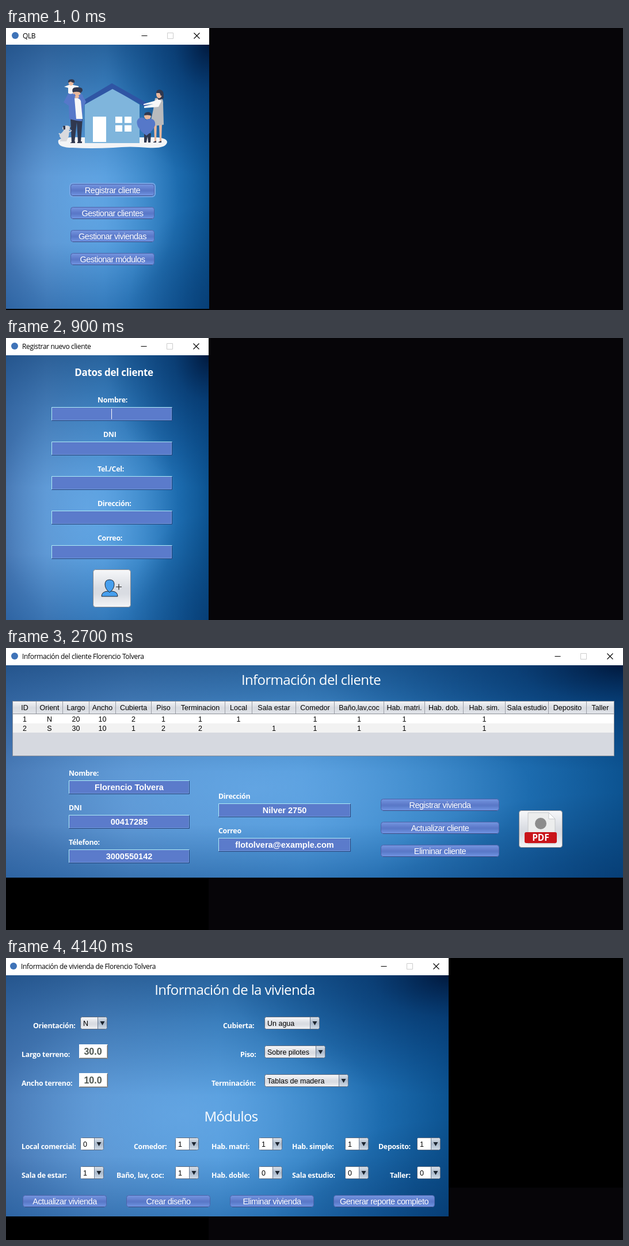
Recreate the animation shown at these times as an HTML page. Size 1072x490 px, loop 4.5 s.

```html
<!DOCTYPE html>
<html lang="es">
<head>
<meta charset="utf-8">
<title>Gestión de viviendas</title>
<style>
  html, body { margin: 0; width: 100%; height: 100%; overflow: hidden; background: #060508; }
  svg { display: block; width: 1072px; height: 490px; }
  .bar { font: 12px "Open Sans", sans-serif; letter-spacing: -.35px; fill: #000; }
  .head { font: 24px "Open Sans", sans-serif; letter-spacing: -.63px; fill: #fff; }
  .sub { font: 700 17px "Open Sans", sans-serif; letter-spacing: -.3px; fill: #fff; }
  .label { font: 700 12.4px "Open Sans", sans-serif; letter-spacing: -.3px; fill: #fff; }
  .btn { font: 14.5px "Liberation Sans", Arial, sans-serif; letter-spacing: -.5px; fill: #fff; }
  .cell { font: 12.5px "Liberation Sans", Arial, sans-serif; fill: #000; }
  .value { font: 700 14.5px "Liberation Sans", Arial, sans-serif; fill: #fff; }
  .num { font: 700 16px "Liberation Sans", Arial, sans-serif; fill: #4d554f; }
  .pdf { font: 700 15.5px "Open Sans", sans-serif; fill: #fff; }
</style>
</head>
<body>
<svg id="stage" viewBox="0 0 1072 490">
  <defs>
    <linearGradient id="base">
      <stop offset="0" stop-color="#4676b2"/><stop offset=".2" stop-color="#5a91cd"/>
      <stop offset=".48" stop-color="#4e99da"/><stop offset=".65" stop-color="#3585c7"/>
      <stop offset=".85" stop-color="#1c6bae"/><stop offset="1" stop-color="#0c5391"/>
    </linearGradient>
    <radialGradient id="glow" cx=".4" cy=".58" r=".45">
      <stop offset="0" stop-color="#68a9e6" stop-opacity=".75"/>
      <stop offset="1" stop-color="#68a9e6" stop-opacity="0"/>
    </radialGradient>
    <linearGradient id="edges" x2="0" y2="1">
      <stop offset="0" stop-color="#0f3f74" stop-opacity=".6"/>
      <stop offset=".2" stop-color="#0f4680" stop-opacity=".32"/>
      <stop offset=".5" stop-color="#0f4680" stop-opacity="0"/>
      <stop offset=".75" stop-color="#0b4a8c" stop-opacity="0"/>
      <stop offset="1" stop-color="#0b4a8c" stop-opacity=".4"/>
    </linearGradient>
    <radialGradient id="corner" cx="1" cy="0" r=".5">
      <stop offset="0" stop-color="#00173a" stop-opacity=".95"/>
      <stop offset=".35" stop-color="#002a5c" stop-opacity=".5"/>
      <stop offset="1" stop-color="#003a78" stop-opacity="0"/>
    </radialGradient>
    <radialGradient id="foot" cx="1" cy="1" r=".4">
      <stop offset="0" stop-color="#012a58" stop-opacity=".45"/>
      <stop offset="1" stop-color="#012a58" stop-opacity="0"/>
    </radialGradient>
    <linearGradient id="blue" x2="0" y2="1">
      <stop offset="0" stop-color="#7596e0"/><stop offset=".5" stop-color="#5b78c8"/>
      <stop offset=".6" stop-color="#5a7ac9"/><stop offset="1" stop-color="#7396e4"/>
    </linearGradient>
    <linearGradient id="grey" x2="0" y2="1">
      <stop offset="0" stop-color="#f7f8fa"/><stop offset=".5" stop-color="#d9dce2"/>
      <stop offset=".65" stop-color="#d9dce2"/><stop offset="1" stop-color="#f4f5f7"/>
    </linearGradient>
    <linearGradient id="header" x2="0" y2="1">
      <stop offset="0" stop-color="#f3f4f6"/><stop offset=".5" stop-color="#d9dce2"/>
      <stop offset="1" stop-color="#e0e3e8"/>
    </linearGradient>
    <linearGradient id="arrow" x2="0" y2="1">
      <stop offset="0" stop-color="#d8dfe8"/><stop offset=".5" stop-color="#aab9cb"/>
      <stop offset="1" stop-color="#cfdae6"/>
    </linearGradient>
  </defs>
</svg>
<script>
const HOLD = 900;
const NAME = "Florencio Tolvera", MAIL = "flotolvera@example.com";
const ID = "00417285", PHONE = "3000550142", STREET = "Nilver 2750";

const box = (x, y, w, h, fill, more = "") =>
  `<rect x="${x}" y="${y}" width="${w}" height="${h}" fill="${fill}" ${more}/>`;
const path = (d, fill, more = "") => `<path d="${d}" fill="${fill}" ${more}/>`;
const line = (d, color, w = 1) => path(d, "none", `stroke="${color}" stroke-width="${w}"`);
const oval = (x, y, rx, ry, fill, more = "") =>
  `<ellipse cx="${x}" cy="${y}" rx="${rx}" ry="${ry}" fill="${fill}" ${more}/>`;
const text = (cls, x, y, s) => `<text class="${cls}" x="${x}" y="${y}">${s}</text>`;
const mid = (cls, x, y, s) => `<text class="${cls}" x="${x}" y="${y}" text-anchor="middle">${s}</text>`;

// Window frame: title bar with controls, and the blue backdrop below it
function frame(w, bottom, bar, title, tx, close) {
  const y = bar === 30 ? 14 : 13, cy = y + .5, cx = close + .5;
  return box(0, 0, w, bar, "#fff") +
    ["base", "glow", "edges", "corner", "foot"]
      .map(g => box(0, bar, w, bottom - bar, `url(#${g})`)).join("") +
    `<circle cx="${tx - 13}" cy="${y}" r="6" fill="#3f73b8"/>` +
    text("bar", tx, y + 5, title) +
    line(`M${cx - 96} ${cy}h10`, "#000") +
    line(`M${cx - 51} ${cy - 5}h10v10h-10z`, "#ccc") +
    line(`M${cx - 5} ${cy - 5}l10 10m0-10l-10 10`, "#000", 1.1);
}

function button(x, y, w, s, focus) {
  return (focus ? box(x - 1, y - 1, w + 2, 23, "none", 'rx="5" stroke="#78a6e6" stroke-width="2"') : "") +
    box(x + .5, y + .5, w - 1, 20, "url(#blue)", 'rx="4" stroke="#4c62a8"') +
    line(`M${x + 4} ${y + 20.5}h${w - 8}`, "#3c4a80") +
    mid("btn", x + w / 2, y + 16, s);
}

function field(x, y, w, s = "") {
  return box(x, y, w, 24, "#5b7bcb") +
    line(`M${x + 1.5} ${y + 22.5}h${w - 3}v-21`, "#6f9bdc") +
    line(`M${x + .5} ${y + 23.5}h${w - 1}v-23`, "#243f78") +
    line(`M${x + .5} ${y + 23}v-22.5h${w - 1}`, "#b0ecf6") +
    mid("value", x + w / 2, y + 17, s);
}

const labelled = (x, y, w, name, s, lx = x) => text("label", lx, y - 8, name) + field(x, y, w, s);

const greyButton = (x, y, w, h) =>
  box(x + .5, y + .5, w - 1, h - 1, "url(#grey)", 'rx="4" stroke="#85888f"');

function pdfButton(x, y, w) {
  const c = x + w / 2;
  return greyButton(x, y, w, 65) +
    path(`M${c - 22} ${y + 4}h36l11 11v43h-47z`, "#eceded", 'stroke="#c4c6c9"') +
    path(`M${c + 14} ${y + 4}v11h11z`, "#fff", 'stroke="#c4c6c9"') +
    oval(c, y + 23, 10, 10, "#8c8c8c") +
    box(c - 28, y + 38, 56, 19, "#c9141a", 'rx="3"') +
    mid("pdf", c, y + 53, "PDF");
}

// edges: column borders; rows: cell texts, the first row is the header
function table(y, h, edges, rows) {
  const x = edges[0], r = edges[edges.length - 1], w = r - x;
  let out = box(x, y, w, h, "#d6d9e0") + box(x, y, w, 21, "url(#header)") +
    box(x, y + 22, w, 16, "#fff") + box(x, y + 38, w, 16, "#f2f2f2") +
    line(`M${x} ${y + 21.5}H${r}`, "#8e9198");
  for (const e of edges.slice(1)) out += line(`M${e + .5} ${y}v21`, "#9a9da5");
  out += box(x - .5, y - .5, w + 1, h + 1, "none", 'stroke="#868c98"');
  rows.forEach((row, i) => row.forEach((s, k) => {
    out += mid("cell", (edges[k] + edges[k + 1]) / 2 + .5, y + [15, 35, 51][i], s);
  }));
  return out;
}

function combo(x, y, w, s, part) {
  const a = x + w - part;
  return box(x + .5, y + .5, w - 1, 21, "url(#grey)", 'rx="3" stroke="#5d6b80"') +
    path(`M${a} ${y + 1}h${part - 4}q3 0 3 3v14q0 3-3 3h${4 - part}z`, "url(#arrow)") +
    line(`M${a + .5} ${y + 1}v20`, "#6d7d94") +
    path(`M${a + part / 2 - 4} ${y + 8}h8l-4 7z`, "#1c2530") +
    text("cell", x + 5, y + 16, s);
}

const picker = (x, y, s) => combo(x, y, 41, "", 17) + box(x + 1, y + 1, 23, 20, "#fff") +
  text("cell", x + 5, y + 16, s);

const numBox = (y, s) => box(127, y, 50, 25, "#fff") +
  line(`M127 ${y + 24.5}h49.5v-24`, "#6d6d6d") + line(`M128 ${y + 23.5}h47.5v-22`, "#b5b5b5") +
  mid("num", 151, y + 18, s);

function family() {
  const dark = "#30384f", skin = "#e9b89c", coat = "#5678c9", white = "#f7f7f8", fur = "#d9dade";
  return path("M91 195q8-6 40-5h110q38-2 39 8q-1 12-34 10q-30-3-60 0q-40 2-70 0q-28 0-25-13z", "#f3f4f6") +
    path("M137 133l47-29 48 29v67h-95z", "#7fb5dc") +
    path("M132 127l52-31 64 36-4 6-59-32-52 29z", "#2f55a4") +
    box(151, 154, 23, 44, "#fff") +
    [[190, 154], [206, 154], [190, 169], [206, 169]].map(([x, y]) => box(x, y, 12, 11, "#fff")).join("") +
    // father with a child on his shoulders
    path("M112 157h21l-3 41h-5l-2-34-4 35h-5z", dark) +
    path("M112 199l8-2v3h-8zm12-1l8-1v3h-8z", dark) +
    path("M108 114q14-5 24 2l7 12-4 8-3 26q-12-1-22-4l-1-23-9-6z", coat) +
    path("M119 122q9-1 11 5l3 31h-11z", white) +
    path("M101 102l11-4 14 3v2l-9 2v8q-5 3-9 0v-9z", white) +
    oval(113, 95, 4.5, 5, skin) + path("M108 95q-1-6 6-6 6 0 5 6-5 0-6-2z", dark) +
    oval(123, 114, 6.5, 8, skin) + path("M116 112q-3-9 7-9 11-1 10 6l-3 4q-5-4-14-1z", dark) +
    path("M113 118l6-4 2 4-7 8zM126 117l5-3 3 4-5 6z", coat) +
    // dog
    path("M101 177l9 1-1 10-4 9h-12l3-4-3-5q0-4 4-6z", fur) +
    oval(105, 174, 7, 4.5, fur) + path("M99 170l4 0 0 6-3 1z", dark) + oval(112, 174, 1.3, 1.3, dark) +
    line("M109 181l5-3M95 186l-3-3", fur, 2) +
    // mother
    path("M257 166h5l-1 31h-3zM266 166h5l-1 31h-3z", skin) +
    path("M256 198l5-2v3h-5zm9 0l5-2v3h-5z", dark) +
    path("M259 122l9-1q6 2 5 11l1 36q-13 3-24 1l6-28z", "#b8babd") +
    path("M239 132l18-5 8-4 5 4-5 10-25 2v-3l16-4-17 2z", white) +
    path("M271 113q5 5 2 10l-8 2-4-7z", dark) +
    oval(266, 115, 5, 7, skin) + path("M261 113q0-6 6-6 7 1 7 9l-5 2-2-5z", dark) +
    // child with a heart
    path("M240 183h12l-1 16h-4l-1-11-2 11h-4z", dark) +
    oval(246, 153, 6, 6, skin) + path("M240 152q0-6 7-6 6 0 6 7-5-3-13-1z", dark) +
    path("M243 160q-5-7-12-3-6 4-2 14 5 9 15 16 12-9 15-18 1-9-6-11-6-1-10 2z", coat);
}

function menu() {
  return box(0, 488, 353, 2, "#000") + frame(353, 488, 29, "QLB", 29, 331) + family() +
    ["Registrar cliente", "Gestionar clientes", "Gestionar viviendas", "Gestionar módulos"]
      .map((s, i) => button(112, 271 + 40 * i, 146, s, i === 0)).join("");
}

function newClient() {
  return frame(352, 490, 30, "Registrar nuevo cliente", 28, 330) +
    mid("sub", 187.5, 66, "Datos del cliente") +
    ["Nombre:", "DNI", "Tel./Cel:", "Dirección:", "Correo:"]
      .map((s, i) => labelled(79, 120 + 60 * i, 210, s, "", i === 1 ? 169 : 159)).join("") +
    line("M183.5 123v18", "#fff") + greyButton(151, 402, 66, 66) +
    path("M166 449q0-8 10-9h9q9 1 9 9z", "#479fee", 'stroke="#1d2530" stroke-linejoin="round"') +
    path("M172 428q0-8 8-8t8 8-8 14q-8-6-8-14z", "#479fee", 'stroke="#1d2530"') +
    line("M191 432.5h10M196 427.5v10", "#222", 1.2);
}

function clients() {
  return box(0, 350, 352, 140, "#000") +
    frame(761, 350, 29, "Gestionar clientes", 28, 740) +
    mid("head", 393, 63, "Clientes registrados") +
    table(92, 154, [22, 76, 236, 316, 426, 546, 736], [
      ["ID", "Nombre", "DNI", "Teléfono", "Dirección", "Correo"],
      ["1", NAME, ID, PHONE, STREET, MAIL],
      ["2", "Constantino Tolvera", "00263914", "3000550187", "La Tusma 3160", "constolvera@example.com"]]) +
    pdfButton(122, 262, 65) + mid("btn", 564, 284, "Filtrar por nombre:") +
    box(491.5, 291.5, 145, 26, "#4161a8", 'stroke="#a9bdd6"') + line("M491 291.5h146", "#2d4c86");
}

function client() {
  const heads = "ID|Orient|Largo|Ancho|Cubierta|Piso|Terminacion|Local|Sala estar|Comedor|Baño,lav,coc|" +
    "Hab. matri.|Hab. dob.|Hab. sim.|Sala estudio|Deposito|Taller";
  const edges = [12, 52, 98, 144, 190, 252, 294, 380, 427, 503, 570, 656, 727, 794, 867, 942, 1008, 1056];
  return box(0, 399, 352, 91, "#000") +
    frame(1072, 399, 30, "Información del cliente " + NAME, 28, 1049) +
    mid("head", 530, 64, "Información del cliente") +
    table(93, 94, edges, [heads, "1|N|20|10|2|1|1|1||1|1|1||1", "2|S|30|10|1|2|2||1|1|1|1||1"]
      .map(s => s.split("|"))) +
    labelled(109, 230, 210, "Nombre:", NAME) + labelled(109, 290, 210, "DNI", ID) +
    labelled(109, 350, 210, "Télefono:", PHONE) +
    labelled(369, 270, 230, "Dirección", STREET) + labelled(369, 330, 230, "Correo", MAIL) +
    ["Registrar vivienda", "Actualizar cliente", "Eliminar cliente"]
      .map((s, i) => button(651, 262 + 40 * i, 206, s)).join("") +
    pdfButton(891, 282, 76);
}

function house() {
  const labels = [
    [47, 122, "Orientación:"], [27, 172, "Largo terreno:"], [27, 222, "Ancho terreno:"],
    [377, 122, "Cubierta:"], [407, 172, "Piso:"], [357, 222, "Terminación:"],
    [27, 332, "Local comercial:"], [222, 332, "Comedor:"], [357, 332, "Hab. matri:"],
    [497, 332, "Hab. simple:"], [647, 332, "Deposito:"],
    [27, 382, "Sala de estar:"], [192, 382, "Baño, lav, coc:"], [357, 382, "Hab. doble:"],
    [497, 382, "Sala estudio:"], [667, 382, "Taller:"]];
  return box(769, 0, 303, 399, "#000") + box(0, 449, 352, 41, "#000") +
    frame(769, 449, 30, "Información de vivienda de " + NAME, 26, 747) +
    mid("head", 397.5, 64, "Información de la vivienda") + mid("head", 391, 284, "Módulos") +
    labels.map(([x, y, s]) => text("label", x, y, s)).join("") +
    combo(129, 102, 47, "N", 17) + numBox(150, "30.0") + numBox(200, "10.0") +
    combo(449, 102, 96, "Un agua", 17) + combo(449, 152, 106, "Sobre pilotes", 17) +
    combo(449, 202, 146, "Tablas de madera", 17) +
    [129, 294, 439, 589, 714].map((x, i) =>
      picker(x, 312, "01111"[i]) + picker(x, 362, "11000"[i])).join("") +
    ["Actualizar vivienda", "Crear diseño", "Eliminar vivienda", "Generar reporte completo"]
      .map((s, i) => button(29 + 180 * i, 412, i === 3 ? 176 : 146, s)).join("");
}

const stage = document.getElementById("stage");
const screens = [menu, newClient, clients, client, house].map(draw => {
  const g = document.createElementNS("http://www.w3.org/2000/svg", "g");
  g.innerHTML = draw();
  stage.append(g);
  return g;
});

function show(t) {
  const now = Math.floor(t / HOLD) % screens.length;
  screens.forEach((g, i) => g.style.display = i === now ? "" : "none");
}

const start = performance.now();
function tick() {
  show(performance.now() - start);
  requestAnimationFrame(tick);
}
tick();
</script>
</body>
</html>
```
